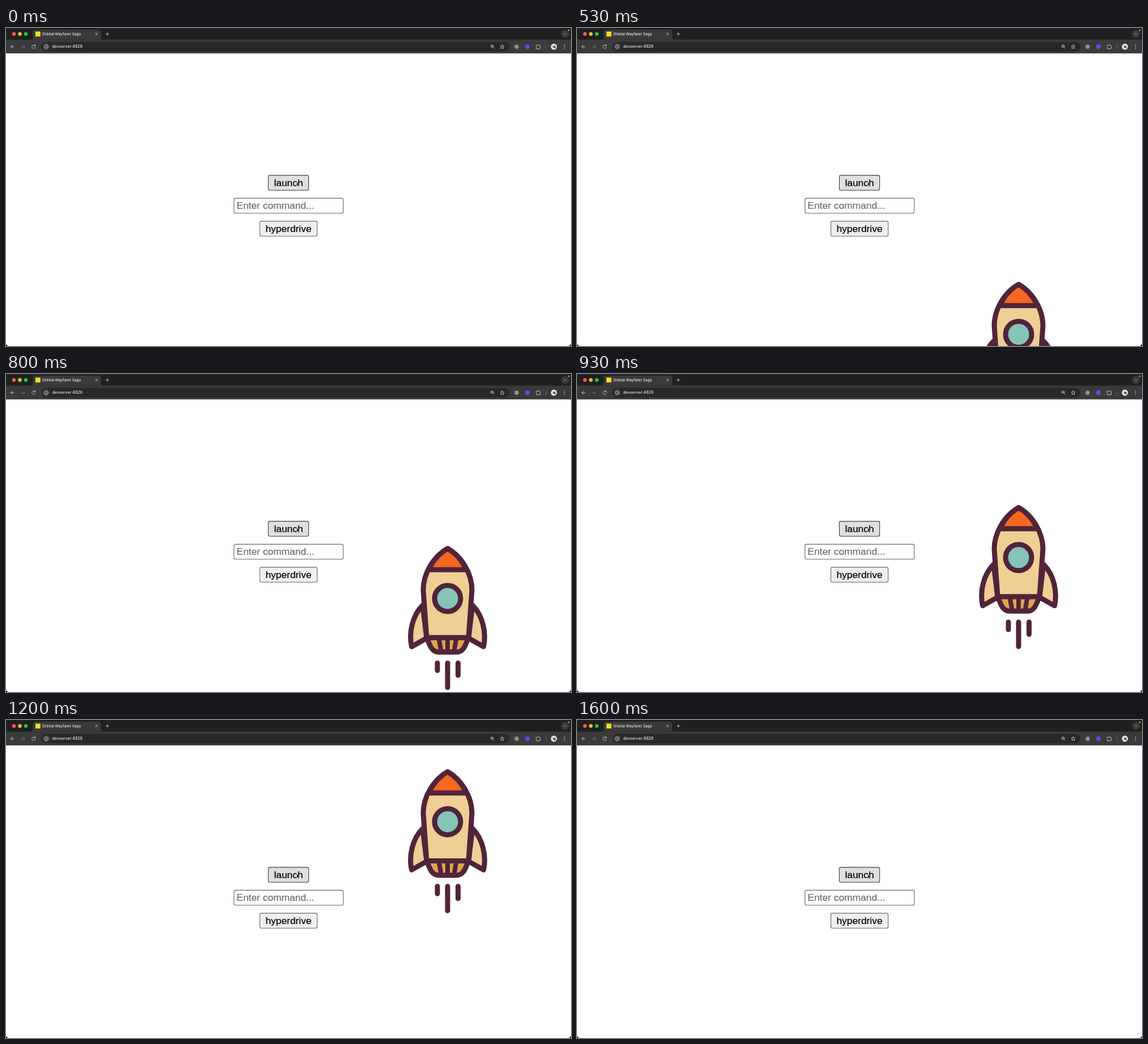
Animation of 998x561 px, one loop 1.67 s. Source, as an HTML page:

```html
<!DOCTYPE html>
<html lang="en">
<head>
<meta charset="utf-8">
<title>Rocket launch</title>
<style>
  html, body { margin: 0; width: 100%; height: 100%; overflow: hidden; background: #000; }
  svg { display: block; }
  .ui { font-family: Inter, Roboto, sans-serif; font-weight: 500; fill: #e8e8e8; }
  .form { font: 17.4px "Liberation Sans", Arial, sans-serif; }
  .form text { stroke: currentColor; stroke-width: .2; }
  .icon { fill: none; stroke: #cfcfcf; stroke-width: .9; stroke-linecap: round; stroke-linejoin: round; }
  .field { stroke: #666; stroke-width: 1.1; }
  .ink { stroke: #50243a; stroke-width: 9; stroke-linecap: round; stroke-linejoin: round; }
</style>
</head>
<body>
<svg width="998" height="561" viewBox="0 0 998 561">
  <!-- window and tab strip -->
  <path d="M0 0H998V556a5 5 0 0 1-5 5H5a5 5 0 0 1-5-5Z" fill="#fff"/>
  <rect width="998" height="21" fill="#1f2020"/>
  <rect y="20.500" width="998" height="24.300" fill="#3a3a3a"/>
  <path d="M43 20.500q4.500 0 4.500-4.500V8q0-5 5-5H163q5 0 5 5v8q0 4.500 4.500 4.500Z" fill="#3a3a3a"/>
  <circle cx="14" cy="10.500" r="3.200" fill="#fe5f57"/>
  <circle cx="24.500" cy="10.500" r="3.200" fill="#febc2e"/>
  <circle cx="35" cy="10.500" r="3.200" fill="#28c840"/>
  <rect x="52" y="6.300" width="8.700" height="8.700" fill="#f5de1e"/>
  <text class="ui" x="64" y="12.700" font-size="6.500">Orbital Wayfarer Saga</text>
  <path class="icon" d="M158.200 8.700l3.600 3.600m0-3.600l-3.600 3.600M176.500 10.500h5m-2.500-2.500v5"/>
  <circle cx="987.500" cy="10.500" r="7" fill="#3a3a3a"/>
  <path class="icon" d="M985.500 9.700l2 2 2-2"/>
  <circle cx="994" cy="4" r="1.500" fill="#f08a24"/>

  <!-- toolbar -->
  <rect x="62" y="24.500" width="827" height="17" rx="8.500" fill="#282828"/>
  <path class="icon" d="M14.500 33h-6m2.700-2.700l-2.700 2.700 2.700 2.700"/>
  <path class="icon" style="stroke:#777" d="M27 33h6m-2.700-2.700l2.700 2.700-2.700 2.700"/>
  <path class="icon" d="M51.500 31.200a3.100 3.100 0 1 0 .4 2.600M51.800 29.400v2.200h-2.200"/>
  <circle cx="71" cy="33" r="6.500" fill="#3a3a3a"/>
  <g class="icon">
    <circle cx="71" cy="33" r="3.300"/>
    <path d="M71 32.800v1.700M71 31.200v.1"/>
    <circle cx="858.500" cy="32" r="2.300"/>
    <path d="M860.300 33.800l2.300 2.300M857.600 32h1.800"/>
    <path d="M876.500 29.500l1.050 2.250 2.450.3-1.800 1.700.5 2.450-2.200-1.200-2.200 1.200.5-2.450-1.800-1.700 2.450-.3Z"/>
    <path d="M936.700 30.500h2a1.200 1.200 0 0 1 2.400 0h2v2a1.200 1.200 0 0 1 0 2.400v1.800h-6.400v-2a1.200 1.200 0 0 0 0-2.200Z"/>
  </g>
  <text class="ui" x="81.500" y="35.400" font-size="7">devserver:4826</text>
  <circle cx="902" cy="33" r="3.800" fill="#8f9294"/>
  <circle cx="921" cy="33" r="4.300" fill="#6a45e6"/>
  <path d="M954 29v8" stroke="#606060"/>
  <circle cx="967.800" cy="33" r="5.400" fill="#dfe5e3"/>
  <ellipse cx="968.500" cy="33.300" rx="2.800" ry="2" fill="#4c625d" transform="rotate(30 968.500 33.300)"/>
  <g fill="#d0d0d0">
    <circle cx="986.500" cy="30" r=".85"/>
    <circle cx="986.500" cy="33" r=".85"/>
    <circle cx="986.500" cy="36" r=".85"/>
  </g>

  <!-- controls -->
  <g class="form">
    <rect id="launch" class="field" x="463.400" y="259.900" width="71.200" height="26.400" rx="2.700"/>
    <rect class="field" x="402.700" y="300.400" width="193" height="26.400" rx="2.700" fill="#fff"/>
    <rect class="field" x="448.400" y="340.900" width="101.200" height="26.400" rx="2.700" fill="#efefef"/>
    <text x="499" y="279" text-anchor="middle">launch</text>
    <text x="407.300" y="319.400" fill="#6c6c6c" color="#6c6c6c">Enter command...</text>
    <text x="499" y="360" text-anchor="middle">hyperdrive</text>
  </g>

  <!-- rocket, drawn with its tip at y = 303 -->
  <g id="rocket" class="ink" fill="#efcf94">
    <path id="fin" d="M736 408C718 426 711 456 716.500 481L743 466Z"/>
    <use href="#fin" transform="matrix(-1 0 0 1 1560 0)"/>
    <path d="M743 465C748 475 750 490 764 490.500H796C810 490 812 475 817 465Z" fill="#e0a450"/>
    <path d="M764.500 466l4 23M780 466v23M795.500 466l-4 23" stroke-width="8"/>
    <path d="M780 308C755 322 737 352 737 381L743 465H817L823 381C823 352 805 322 780 308Z"/>
    <path d="M780 308C766 316 754 329 747 345.300H813C806 329 794 316 780 308Z" fill="#f76720"/>
    <circle cx="780" cy="396" r="23" fill="#84c4b9"/>
    <path d="M762 510v13M780 510v43M798.500 510v21.500"/>
  </g>

  <path id="cursor" d="M513.500 271v8.200l1.900-1.700 1.300 3 1.500-.6-1.300-3h2.500Z"
        fill="#222" stroke="#fff" stroke-width=".6"/>
</svg>
<script>
  const LOOP = 1670, STEP = 1000 / 15;
  const [launch, rocket, cursor] = ["launch", "rocket", "cursor"].map(id => document.getElementById(id));

  function draw(now) {
    // The screen refreshes 15 times a second
    const tick = Math.floor((now % LOOP + 3.4) / STEP);
    const pressed = tick === 4;
    launch.style.fill = pressed ? "#f3f1f4" : "#dfdfdf";
    launch.style.stroke = pressed ? "#999" : "#3a3a3a";

    const flying = tick >= 5 && tick < 20;
    rocket.style.display = flying ? "" : "none";
    rocket.setAttribute("transform", `translate(0 ${36.1 * (12 - tick)})`);

    cursor.setAttribute("transform", tick >= 24 ? "translate(.4 .7)" : "");
  }

  const start = performance.now();
  (function frame() {
    draw(performance.now() - start);
    requestAnimationFrame(frame);
  })();
</script>
</body>
</html>
```
